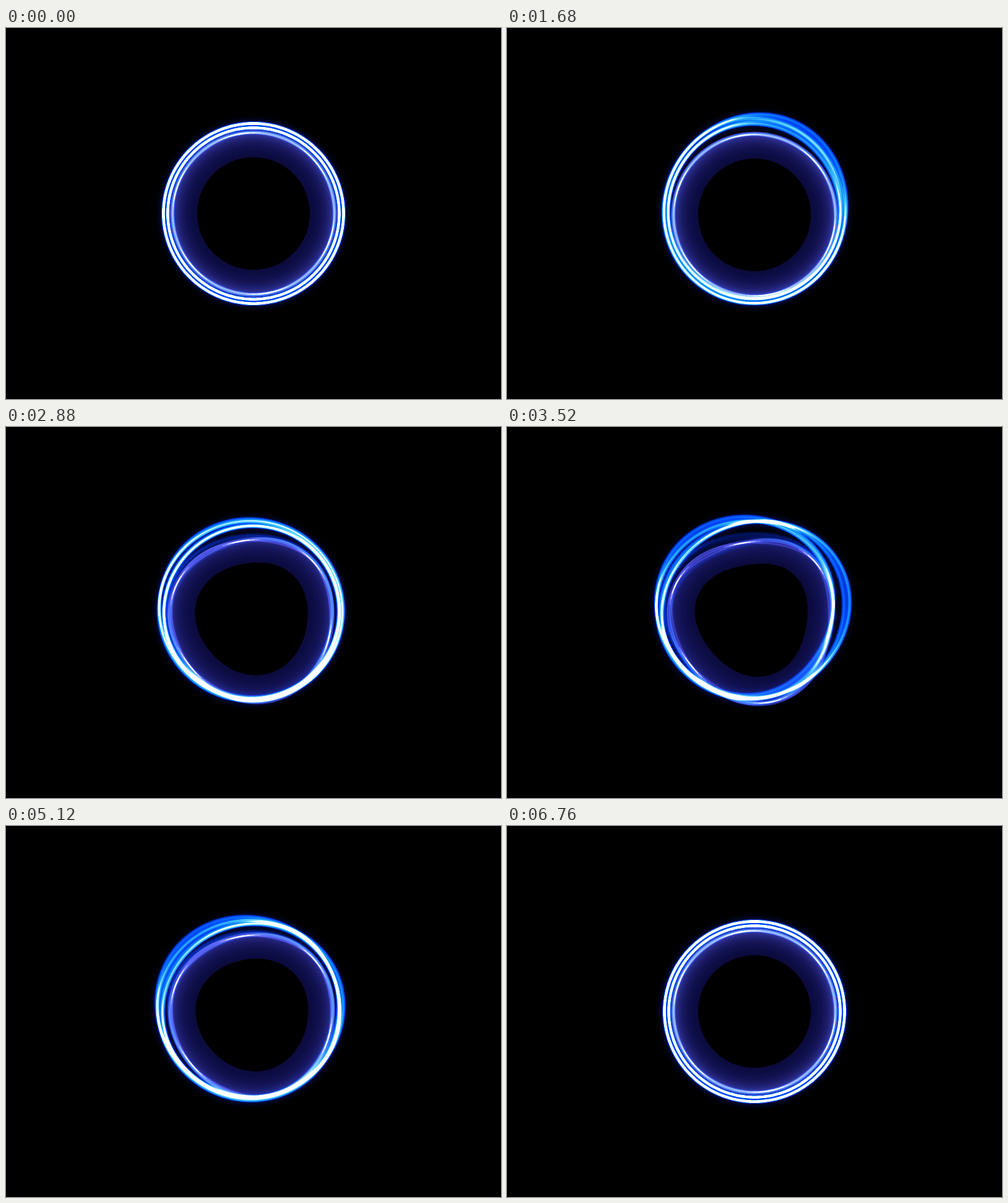
An HTML page with a canvas for the animation above (6.8 s loop, 800 by 600 pixels).

```html
<!DOCTYPE html>
<html lang="en">
<head>
<meta charset="utf-8">
<title>Light ring</title>
<style>
  html, body { margin: 0; width: 100%; height: 100%; overflow: hidden; background: #000; }
  canvas { position: absolute; left: 0; top: 0; width: 800px; height: 600px; }
  #rings { filter: url(#light); mix-blend-mode: screen; }
  svg { position: absolute; width: 0; height: 0; }
</style>
</head>
<body>
<svg>
  <!-- turns grey light into blue, cyan and white, then adds a soft halo -->
  <filter id="light" x="0" y="0" width="100%" height="100%" color-interpolation-filters="sRGB">
    <feGaussianBlur in="SourceGraphic" stdDeviation="6" result="soft"/>
    <feColorMatrix in="soft" result="halo"
      values="0 0 0 0 0  .1 0 0 0 0  .55 0 0 0 0  0 0 0 1 0"/>
    <feGaussianBlur in="SourceGraphic" stdDeviation=".6"/>
    <feComponentTransfer result="core">
      <feFuncR type="gamma" exponent="4.5"/>
      <feFuncG type="gamma" exponent="1.25"/>
      <feFuncB type="table" tableValues="0 .55 .95 1 1 1"/>
    </feComponentTransfer>
    <feComposite in="core" in2="halo" operator="arithmetic" k1="0" k2="1" k3="1" k4="0"/>
  </filter>
</svg>
<canvas id="band" width="800" height="600"></canvas>
<canvas id="rings" width="800" height="600"></canvas>
<script>
const LOOP = 6800, STEP = 40, POINTS = 180, COPIES = 14, LAG = 150;
const TAU = Math.PI * 2, DEG = Math.PI / 180;
const band = document.getElementById('band').getContext('2d');
const rings = document.getElementById('rings').getContext('2d');

// Each lobe swells towards one direction (degrees) and sinks back.
const outer = [
  { dir: -78, size: 13, from: 0, to: 2900 },
  { dir: -155, size: 18, from: 2000, to: 6600 },
  { dir: 15, size: -28, from: 2700, to: 5600 },
  { dir: 90, size: -5, from: 2000, to: 6000 }
];
const inner = [
  { dir: -85, size: 9, from: 0, to: 2900 },
  { dir: 178, size: 13, from: 2000, to: 6600 },
  { dir: -38, size: 25, from: 2700, to: 5600 }
];

// One swell from 0 to 1 and back, rising a little faster than it falls.
function pulse(t, from, to) {
  const p = Math.min(1, Math.max(0, (t - from) / (to - from)));
  return Math.sin(Math.PI * p ** 0.85) ** 2;
}

const bump = (a, dir) => Math.cos((a - dir) / 2) ** 8;

function outline(radius, from = 0, to = TAU) {
  const path = new Path2D(), n = Math.ceil(POINTS * (to - from) / TAU);
  for (let i = 0; i <= n; i++) {
    const a = from + (to - from) * i / n, r = radius(a);
    path.lineTo(400 + r * Math.cos(a), 300 + r * Math.sin(a));
  }
  if (to - from === TAU) path.closePath();
  return path;
}

function stroke(ctx, path, width, style) {
  ctx.lineWidth = width;
  ctx.strokeStyle = style;
  ctx.stroke(path);
}

function clear(ctx) {
  ctx.globalCompositeOperation = 'source-over';
  ctx.fillStyle = '#000';
  ctx.fillRect(0, 0, 800, 600);
}

// Adds up faint copies; radiusFor gives the curve of the copy at u = -0.5 ... 0.5.
function drawCopies(weight, radiusFor) {
  for (let i = 0; i < COPIES; i++) {
    const path = outline(radiusFor(Math.cos(Math.PI * i / (COPIES - 1)) / 2));
    stroke(rings, path, 7, `rgba(255,255,255,${0.016 * weight})`);
    stroke(rings, path, 4.4, `rgba(255,255,255,${0.075 * weight})`);
  }
}

// Copies lag, reach further and lean sideways by u, so the ring fans out where it bends.
function drawRing(base, lobes, t, loose) {
  drawCopies(1, u => {
    const moved = lobes.map(l => ({
      dir: l.dir * DEG + 0.35 * u,
      size: l.size * (1 + 0.6 * u) * pulse(t - LAG * (u + 0.5), l.from, l.to)
    }));
    return a => moved.reduce((r, l) => r + l.size * bump(a, l.dir),
      base + 5 * loose * u * Math.cos(a + 2 * u + 0.8));
  });
}

// Radius of a band line: sinks downwards and takes on three soft corners.
function bandShape(t) {
  const corner = 5.2 * pulse(t, 1900, 6300), drop = 9 * pulse(t, 1000, 6600);
  return (a, r) => r + (1 + (r - 91) / 160) *
    (drop * Math.sin(a) - 0.4 * corner * Math.cos(a) + corner * Math.cos(3 * (a - 76 * DEG)));
}

function drawBand(shape, bent) {
  for (let r = 135; r > 91; r--) {
    const p = (r - 91) / 44, edge = (1 - 0.6 * bent) * p ** 3;
    const red = 11 + 10 * p + 45 * edge, blue = 60 + 40 * p + 75 * edge;
    band.fillStyle = `rgb(${red},${red},${blue})`;
    band.fill(outline(a => shape(a, r)));
  }
  band.fillStyle = '#000';
  band.fill(outline(a => shape(a, 91)));

  // Thin strands that cross in six bright knots.
  band.globalCompositeOperation = 'lighter';
  const swing = 1.2 + 3 * bent;
  for (const side of [-1, 0, 1]) {
    const strand = outline(a => shape(a, 130.5) + side * swing * Math.sin(3 * (a - 20 * DEG)));
    stroke(band, strand, 4, 'rgba(60,60,190,.2)');
    stroke(band, strand, 1.3, `rgba(130,120,225,${0.4 - 0.2 * bent})`);
  }
  for (let k = 0; k < 6; k++) {
    const mid = (20 + 60 * k) * DEG;
    for (let half = 3; half < 16; half += 4) {
      const arc = outline(a => shape(a, 130.5), mid - half * DEG, mid + half * DEG);
      stroke(band, arc, 3.2 - half * 0.13, 'rgba(160,150,255,.32)');
    }
  }
}

// Dim blue veil that lifts off the band at the upper left.
function drawVeil(shape, bent) {
  drawCopies(0.35, u => a => shape(a, 131) +
    bent * (8 * u * Math.cos(2 * a + 3 * u) + 26 * (u + 0.3) * bump(a, -125 * DEG)));
}

function draw(now) {
  const t = Math.floor(now % LOOP / STEP) * STEP;
  const shape = bandShape(t), bent = pulse(t, 1900, 6300);
  const loose = Math.min(1, 1.6 * Math.sin(Math.PI * t / LOOP) ** 2);
  clear(band);
  drawBand(shape, bent);
  clear(rings);
  rings.globalCompositeOperation = 'lighter';
  drawRing(145.6, outer, t, loose);
  drawRing(138.6, inner, t, loose);
  drawVeil(shape, bent);
}

const start = performance.now();
function tick() {
  draw(performance.now() - start);
  requestAnimationFrame(tick);
}
tick();
</script>
</body>
</html>
```
